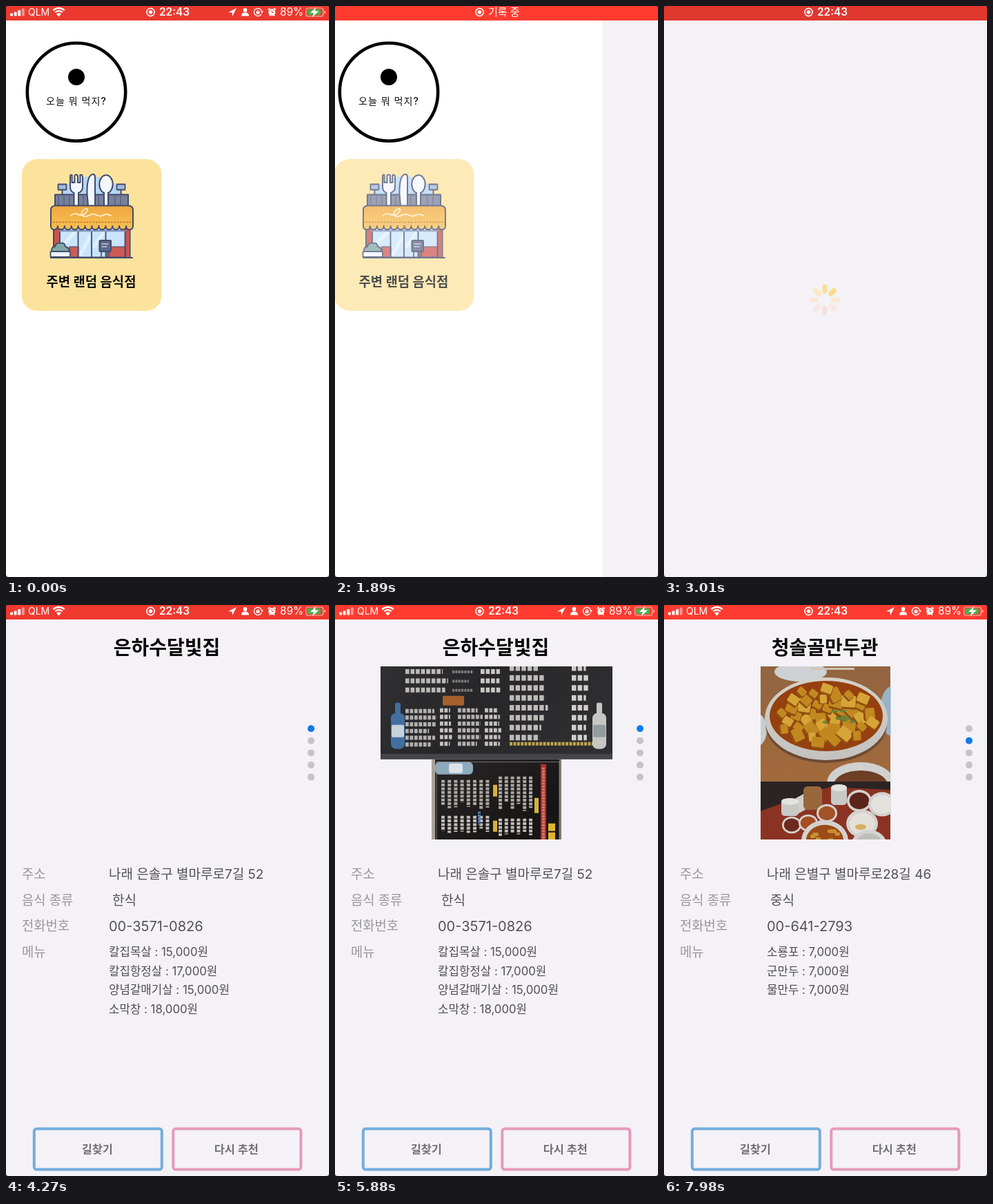
Animation of 468 by 828 pixels, one loop 8000 ms. Source, as an HTML page with a canvas:

```html
<!DOCTYPE html>
<html lang="ko">
<head>
<meta charset="utf-8">
<title>랜덤 음식점</title>
<style>
html, body { margin: 0; width: 100%; height: 100%; overflow: hidden; background: #fff; }
canvas { display: block; width: 468px; height: 828px; }
</style>
</head>
<body>
<canvas id="stage"></canvas>
<script>
const W = 468, H = 828, LOOP = 8000, STEP = 70;
const FONT = "Inter, 'Noto Sans CJK KR', 'Noto Sans CJK', sans-serif";
const PAPER = '#f4f2f6', INK = '#414b6c';
const PAGE = { y: 89, h: 251 };

const places = [
  {
    name: '은하수달빛집', address: '나래 은솔구 별마루로7길 52', kind: '한식', phone: '00-3571-0826',
    menu: ['칼집목살 : 15,000원', '칼집항정살 : 17,000원', '양념갈매기살 : 15,000원', '소막창 : 18,000원'],
    photos: [menuBoard, turnedBoard]
  },
  {
    name: '청솔골만두관', address: '나래 은별구 별마루로28길 46', kind: '중식', phone: '00-641-2793',
    menu: ['소룡포 : 7,000원', '군만두 : 7,000원', '물만두 : 7,000원'],
    photos: [null, tofuBowl, sideDishes]
  }
];

const canvas = document.getElementById('stage');
const c = canvas.getContext('2d');
const dpr = window.devicePixelRatio || 1;
canvas.width = W * dpr;
canvas.height = H * dpr;

const clamp = v => Math.min(1, Math.max(0, v));
const ramp = (t, from, to) => clamp((t - from) / (to - from));
const ease = u => (1 - Math.cos(Math.PI * u)) / 2;
const noise = n => { const s = Math.sin(n * 91.7) * 4375.5; return s - Math.floor(s); };

function box(x, y, w, h, fill, r = 0, stroke, lw = 2) {
  c.beginPath();
  c.roundRect(x, y, w, h, r);
  paint(fill, stroke, lw);
}
function oval(x, y, rx, ry, fill, stroke, lw = 2) {
  c.beginPath();
  c.ellipse(x, y, rx, ry, 0, 0, 7);
  paint(fill, stroke, lw);
}
function shape(d, fill, stroke, lw = 2) {
  const p = new Path2D(d);
  if (fill) { c.fillStyle = fill; c.fill(p); }
  if (stroke) { c.strokeStyle = stroke; c.lineWidth = lw; c.stroke(p); }
}
function paint(fill, stroke, lw) {
  if (fill) { c.fillStyle = fill; c.fill(); }
  if (stroke) { c.strokeStyle = stroke; c.lineWidth = lw; c.stroke(); }
}
function text(s, x, y, size, color, weight = 400, align = 'left', gap = 0) {
  c.font = `${weight} ${size}px ${FONT}`;
  c.letterSpacing = gap + 'px';
  c.textAlign = align;
  c.fillStyle = color;
  c.fillText(s, x, y);
  c.letterSpacing = '0px';
}
function fade(x0, y0, x1, y1, ...colors) {
  const g = c.createLinearGradient(x0, y0, x1, y1);
  colors.forEach((color, i) => g.addColorStop(i / (colors.length - 1), color));
  return g;
}

// ---------- status bar ----------
function statusBar(t) {
  const wave = ((1 + Math.cos((t - 1890) * Math.PI / 1000)) / 2) ** 2;
  const glow = t < 890 ? 0.4 * (1 - ease(t / 890)) : wave;
  box(0, 0, W, 21, `rgb(${224 + 31 * glow},${55 + 4 * glow},${46 + 2 * glow})`);
  oval(209.5, 9, 5.6, 5.6, null, '#fff', 1.6);
  oval(209.5, 9, 2.8, 2.8, '#fff');
  if (t >= 1750 && t < 2940) text('기록 중', 222, 14.2, 15, '#fff');
  else text('22:43', 222, 14.4, 15.4, '#fff', 600);
  if (t < 1750 || t >= 3080) statusIcons();
}
function statusIcons() {
  [4, 6, 8.5, 11].forEach((h, i) =>
    box(6 + i * 5.6, 14.5 - h, 4, h, i < 3 ? '#fff' : 'rgba(255,255,255,.45)', 1));
  text('QLM', 32, 14.4, 14, '#fff');
  for (const r of [11.5, 7.4]) {
    c.beginPath();
    c.arc(76.5, 14.5, r, -2.35, -0.79);
    paint(null, '#fff', 2.4);
  }
  shape('M76.5 15.5 L73 11.7 Q76.5 8.8 80 11.7 Z', '#fff');

  shape('M322 9.2 L334 3 L328 15 L327.6 9.6 Z', '#fff');
  oval(346.5, 6, 2.8, 3, '#fff');
  shape('M341 14.5 Q341 9.6 346.5 9.6 Q352 9.6 352 14.5 Z', '#fff');
  c.beginPath();
  c.arc(365, 9, 5.6, 0.4, 5.9);
  paint(null, '#fff', 1.3);
  shape('M368.5 7.6 h4.6 l-2 3 Z', '#fff');
  box(362.6, 8, 4.8, 3.8, '#fff', 0.6);
  shape('M363.6 8.5 V7.2 Q365 4.8 366.4 7.2 V8.5', null, '#fff', 1);
  oval(385.3, 9.2, 5, 5, '#fff');
  shape('M379.8 5.5 L382.6 3.2 M390.8 5.5 L388 3.2 M381.5 14.5 l1.2 -1.3 M389 14.5 l-1.2 -1.3', null, '#fff', 1.7);
  shape('M385.3 6 V9.4 H387.8', null, '#e8392f', 1);
  text('89%', 397, 14.4, 15.3, '#fff');
  box(434.5, 3, 25, 12, null, 3, 'rgba(255,255,255,.65)', 1.2);
  box(436.3, 4.8, 19.5, 8.4, '#4fae4b', 1.6);
  box(461, 7, 1.8, 4, 'rgba(255,255,255,.65)', 1);
  shape('M449.5 1.5 L441 10 H446 L443.5 16.5 L453 7.5 H447.5 Z', '#fff');
}

// ---------- home ----------
function home(t) {
  box(0, 0, W, H, '#fff');
  oval(102, 124.7, 71.2, 71, null, '#000', 4.6);
  oval(102, 103, 12, 12, '#000');
  text('오늘 뭐 먹지?', 58, 143.4, 14, '#111', 500, 'left', 1.1);

  box(23, 222, 202.5, 220, '#fce39d', 22);
  store();
  text('주변 랜덤 음식점', 123.5, 407, 18.8, '#111', 700, 'center');
  const press = t < 1750 ? ramp(t, 1540, 1690) : 1 - ramp(t, 1760, 2010);
  if (press > 0) box(22, 221, 204.5, 222, `rgba(255,255,255,${0.54 * press})`, 22);
}
function store() {
  c.lineJoin = c.lineCap = 'round';
  oval(124, 274, 42, 27, '#b7d5f7');
  for (const x of [81.5, 166.5]) {
    shape(`M${x} 267 V274`, null, INK);
    box(x - 6, 258.5, 12, 8, '#a5b9dd', 0.5, INK, 1.8);
  }
  box(71, 273.5, 106, 17, '#78819b', 0, INK);
  for (const x of [76, 84, 92, 112, 134, 158, 166]) shape(`M${x} 274 V289`, null, '#586280', 1.4);

  shape('M93 247 Q93 244 95.5 245 V256 H99.5 V246 Q101.7 243 104 246 V256 H107.5 V245 Q111 244 111 248 V262 Q111 269 105 271 V290 H98.5 V271 Q93 269 93 262 Z', '#f4f7fd', INK);
  shape('M119 290 L117.5 272 Q117 245 126 244 Q129 244 129 248 V290 Z', '#f4f7fd', INK);
  oval(145, 258.5, 9.7, 13.2, '#f4f7fd', INK);
  box(142, 271, 6, 19, '#f4f7fd', 0, INK);
  box(143, 268, 4, 6, '#f4f7fd');

  box(69, 320, 110.5, 44.5, '#c9e4fb', 0, INK);
  box(70, 321, 8, 43, '#c95350');
  box(172, 321, 7, 43, '#c95350');
  box(92, 349, 13, 15, '#ce5a56', 0, INK, 1.2);
  box(146, 349, 27, 15, '#ce5a56', 0, INK, 1.2);
  shape('M80 349 L101 327 M108 360 L122 334 M128 348 L142 328', null, '#e1f0fd', 5);
  shape('M78 326 V350 M104.5 326 V364 M124 326 V364 M144.5 326 V364 M172.5 326 V364', null, INK, 1.8);
  shape('M78 326 H172', null, '#8195bb', 2.5);

  const scallops = ' c0 7 -9.92 7 -9.92 0'.repeat(12);
  shape(`M65 319 V296 Q65 289.5 72 289.5 H177 Q184 289.5 184 296 V319${scallops} Z`,
    fade(0, 290, 0, 325, '#f0a840', '#f9c052'), INK);
  shape('M94 304 C101 296 105 307 113 302 C122 296 118 291 112 296 C105 303 112 308 122 303 C130 298 134 309 141 303 Q147 301 152 304', null, '#fff4d6', 1.7);
  c.setLineDash([1.4, 3]);
  shape('M69 313.5 H180', null, '#b37630', 1.6);
  c.setLineDash([]);

  box(135.5, 340, 16.5, 16, '#5d6785', 1, INK);
  shape('M139 345 H148 M139 349 H146', null, '#c3cce0', 1.3);
  shape('M138 356 V364 M149 356 V364', null, INK, 1.6);
  shape('M66 357 Q65 349 71 349 Q73 342 79 344 Q85 342 86 349 Q92 350 92 357 Z', '#7fa7a6', INK, 1.8);
  box(64.5, 356, 28.5, 8, '#eef2fa', 1, INK, 1.8);
  shape('M65 365 H183', null, INK, 2.2);
  c.lineJoin = 'miter';
  c.lineCap = 'butt';
}

// ---------- photos, drawn with their top left corner at 0,0 ----------
// Lines of broken strokes that read as small lettering.
function lettering(x, y, w, h, n, pitch, color, seed, upright) {
  c.setLineDash([h * 0.8, h * 0.28]);
  for (let i = 0; i < n; i++) {
    const len = w * (0.72 + 0.28 * noise(seed + i)), at = i * pitch + h / 2;
    shape(upright ? `M${x + at} ${y} v${len}` : `M${x} ${y + at} h${len}`, null, color, h);
  }
  c.setLineDash([]);
}
function menuBoard() {
  c.translate(66, 0);
  box(0, 0, 336, 251, fade(0, 0, 336, 251, '#343437', '#27272a', '#303033'));
  box(0, 243, 336, 8, '#454447');
  box(36, 14, 140, 14, '#d7a33c');
  lettering(36, 40, 62, 7, 9, 13.4, '#bbb9b6', 3);
  lettering(104, 42, 32, 4, 9, 13.4, '#7f7d7b', 8);
  lettering(145, 40, 30, 7, 9, 13.4, '#cac8c5', 5);
  box(90, 159, 31, 14, '#a5602d', 2);
  lettering(36, 178, 46, 6, 6, 9.7, '#b3b1ae', 12);
  lettering(86, 177, 19, 6, 6, 9.7, '#c4c2bf', 2);
  lettering(112, 177, 36, 6, 6, 9.7, '#b3b1ae', 17);
  lettering(151, 177, 24, 6, 6, 9.7, '#c4c2bf', 7);
  lettering(187, 14, 59, 8, 15, 14.4, '#bebcb9', 24);
  lettering(277, 14, 28, 8, 15, 14.4, '#d0ceca', 31);
  lettering(187, 226, 145, 5, 1, 0, '#c2a548', 6);
  bottle(25, 169, '#426f9f', '#c4d2da');
  bottle(317, 169, '#c6c7c4', '#929d9f');
}
function bottle(x, y, body, label) {
  box(x - 4, y, 8, 20, body, 2);
  box(x - 10, y + 15, 20, 52, body, 7);
  box(x - 9, y + 32, 18, 18, label, 2);
}
function turnedBoard() {
  c.translate(140, 0);
  box(0, 0, 188, 251, fade(0, 0, 188, 251, '#292828', '#171514', '#211b18'));
  box(0, 0, 5, 251, '#aaa399');
  box(7, 4, 178, 243, null, 0, '#77736f', 1);
  box(185, 0, 3, 251, '#827b73');
  box(5, 4, 55, 18, '#8fa9bd', 6);
  box(25, 6, 20, 14, '#dce4e9', 3);
  box(8, 237, 62, 13, '#a96d35', 5);
  box(30, 238, 20, 12, '#365f91', 2);

  lettering(14, 30, 43, 5, 8, 9.2, '#aaa7a3', 4, true);
  lettering(14, 82, 25, 5, 8, 9.2, '#c1beba', 9, true);
  lettering(97, 25, 50, 5, 6, 8.8, '#aaa7a3', 14, true);
  lettering(97, 86, 25, 5, 6, 8.8, '#c1beba', 18, true);
  lettering(67, 76, 25, 4, 1, 0, '#4e84bb', 7, true);
  box(89, 37, 6, 17, '#d9b13a');
  box(89, 89, 6, 16, '#d9b13a');
  box(149, 56, 6, 22, '#d9b13a');
  box(149, 158, 6, 16, '#d9b13a');
  for (let i = 0; i < 5; i++) {
    const x = 53 + i * 20.5;
    box(x + 6, 116, 5, 10, '#c63831', 1);
    lettering(x, 127, 74, 4, 1, 0, '#85817d', i, true);
    lettering(x + 6, 129, 72, 5, 1, 0, '#b3afaa', i + 8, true);
    lettering(x + 6, 209, 28, 7, 1, 0, '#dad7d3', i + 5, true);
  }
  box(26, 119, 21, 113, null, 0, '#8b8781', 1);
  lettering(31, 139, 72, 3, 2, 8, '#a59b72', 21, true);
  lettering(13, 120, 122, 4, 1, 0, '#86817b', 4, true);
  box(158, 7, 8, 235, '#b42d29');
  lettering(160, 12, 240, 4, 1, 0, '#d9736b', 2, true);
  c.setLineDash([11, 2]);
  shape('M174 93 V166', null, '#dfb52f', 10);
  c.setLineDash([]);
}
function tofuBowl() {
  c.translate(140, 0);
  box(0, 0, 188, 251, fade(0, 0, 0, 251, '#8a6242', '#a26a3c'));
  oval(58, 92, 38, 14, '#cdd1d3');
  box(72, 86, 64, 3, '#d1c5b3', 1);
  oval(-6, 176, 15, 24, '#c6ced2');
  oval(190, 149, 17, 36, '#9ab3c4');
  oval(95, 168, 88, 56, '#6d4a33');
  oval(95, 160, 89, 60, fade(0, 105, 0, 220, '#d3d0c9', '#c4c2bf'));
  oval(95, 156, 82, 51, '#95400f');
  for (let i = 0; i < 44; i++) {
    const a = i * 2.4, r = Math.sqrt((i + 0.5) / 44);
    const size = 12 + 9 * noise(i);
    c.save();
    c.translate(95 + 70 * r * Math.cos(a), 156 + 42 * r * Math.sin(a));
    c.rotate(noise(i + 50) * 1.5);
    box(-size / 2 + 1, -size / 2 + 2, size, size * 0.85, '#8f5010', 2);
    box(-size / 2, -size / 2, size, size * 0.8, i % 3 ? '#c28820' : '#d6a437', 2);
    c.restore();
  }
  for (let i = 0; i < 9; i++) oval(88 + 45 * noise(i + 4), 147 + 18 * noise(i + 7), 4, 2, '#668238');
  oval(145, 253, 49, 30, '#d0d1cf');
  oval(145, 256, 39, 21, '#6e3e27');
}
function sideDishes() {
  c.translate(140, 0);
  box(0, 0, 188, 251, '#8b3322');
  shape('M0 0 H188 V12 L100 8 L62 20 L0 43 Z', '#2b2423');
  shape('M32 35 L69 14 L82 31 L52 48 Z', '#d0cfce');
  const cup = (x, y, w, h) => { box(x, y, w, h, '#c8c8c5', 5); oval(x + w / 2, y + 4, w / 2, 5, '#e2e2de'); };
  cup(30, 25, 25, 25);
  cup(102, 5, 23, 29);
  box(62, 7, 27, 34, '#98683c', 6);
  const dish = (x, y, r, food) => { oval(x, y, r, r * 0.88, '#d3d2cf'); oval(x, y, r * 0.8, r * 0.68, food); };
  dish(143, 28, 18, '#5d241a');
  dish(176, 33, 20, '#e4e2dc');
  dish(45, 63, 14, '#6b2a1c');
  dish(69, 60, 14, '#a84d22');
  dish(96, 46, 15, '#a15226');
  dish(147, 61, 23, '#e2e0d9');
  oval(145, 66, 8, 4, '#d6ae61');
  dish(93, 86, 34, '#9b4c18');
  for (let i = 0; i < 18; i++) box(72 + 37 * noise(i), 68 + 30 * noise(i + 30), 7, 5, '#c88f32', 1);
  dish(157, 93, 26, '#bebfbc');
}

// ---------- detail ----------
function photos(place, scroll) {
  c.save();
  c.beginPath();
  c.rect(0, PAGE.y, 420, PAGE.h);
  c.clip();
  place.photos.forEach((draw, i) => {
    if (!draw || Math.abs(i - scroll) >= 1) return;
    const wide = draw === menuBoard;
    c.save();
    c.translate(0, PAGE.y + (i - scroll) * PAGE.h);
    c.beginPath();
    c.rect(wide ? 66 : 140, 0, wide ? 336 : 188.5, PAGE.h);
    c.clip();
    draw();
    c.restore();
  });
  c.restore();
}
function button(x, label, color) {
  box(x + 1.8, 759.6, 185, 59, null, 3.5, color, 4);
  text(label, x + 93.3, 794.6, 16.4, '#727176', 700, 'center');
}
function detail(t) {
  const place = places[t < 7330 ? 0 : 1];
  text(place.name, 233, 72, 28, '#080808', 700, 'center');
  const loaded = t < 7330 ? t >= 4690 : t >= 7480;
  const scroll = ease(ramp(t, 5613, 6173)) + ease(ramp(t, 7760, 8320));
  if (loaded) photos(place, scroll);

  const active = t < 6200 ? 0 : 1;
  for (let i = 0; i < 5; i++) oval(442, 179.2 + i * 17.6, 5, 5, i === active ? '#0b7bec' : '#c4c3c8');

  ['주소', '음식 종류', '전화번호', '메뉴'].forEach((s, i) => text(s, 23, 397 + i * 37.5, 18.8, '#97969b'));
  text(place.address, 149, 397, 19, '#525156');
  text(place.kind, 154, 434.5, 19, '#525156');
  text(place.phone, 149, 472.5, 20, '#525156');
  place.menu.forEach((s, i) => text(s, 149, 509 + i * 27.7, 16.8, '#4f4e53'));

  button(39, '길찾기', '#72addd');
  button(240.5, '다시 추천', '#e59abb');
  const press = t < 7150 ? ramp(t, 6960, 7110) : 1 - ramp(t, 7150, 7400);
  if (press > 0) box(240, 757, 190, 64, `rgba(244,242,246,${0.8 * press})`);
}
function spinner(t) {
  const tones = ['#fdd98c', '#f9dc98', '#fce8c0', '#f9e9d8', '#f8e7e4', '#fbdfdb', '#fae8e2', '#fbe9d2'];
  const lead = Math.floor((t - 3010) / 100) + 1;
  c.lineCap = 'round';
  for (let i = 0; i < 8; i++) {
    const a = i * Math.PI / 4 - Math.PI / 2, x = Math.cos(a), y = Math.sin(a);
    const tone = tones[(((lead - i) % 8) + 8) % 8];
    shape(`M${233 + 12.5 * x} ${426 + 12.5 * y} L${233 + 19 * x} ${426 + 19 * y}`, null, tone, 7);
  }
  c.lineCap = 'butt';
}

function scene(t) {
  const x = 12 * Math.max(0, t - 1828) / 1000;
  const push = t > 2520 ? 1 : 1 - (1 + x) * Math.exp(-x);
  if (push < 1) {
    c.save();
    c.translate(-0.3 * W * push, 0);
    home(t);
    c.restore();
  }
  if (push > 0) {
    c.save();
    c.translate(W * (1 - push), 0);
    box(0, 0, W, H, PAPER);
    if (t < 3290) spinner(t);
    else detail(t);
    c.restore();
  }
  statusBar(t);
  shape('M0 0 H3 Q0 0 0 3 Z M468 0 V3 Q468 0 465 0 Z M0 828 V824 Q0 828 4 828 Z M468 828 H464 Q468 828 468 824 Z', '#444');
}

let start;
function tick(now) {
  start ??= now;
  const t = Math.floor((now - start) % LOOP / STEP) * STEP;
  c.setTransform(dpr, 0, 0, dpr, 0, 0);
  c.fillStyle = '#fff';
  c.fillRect(0, 0, W, H);
  scene(t);
  requestAnimationFrame(tick);
}
requestAnimationFrame(tick);
</script>
</body>
</html>
```
